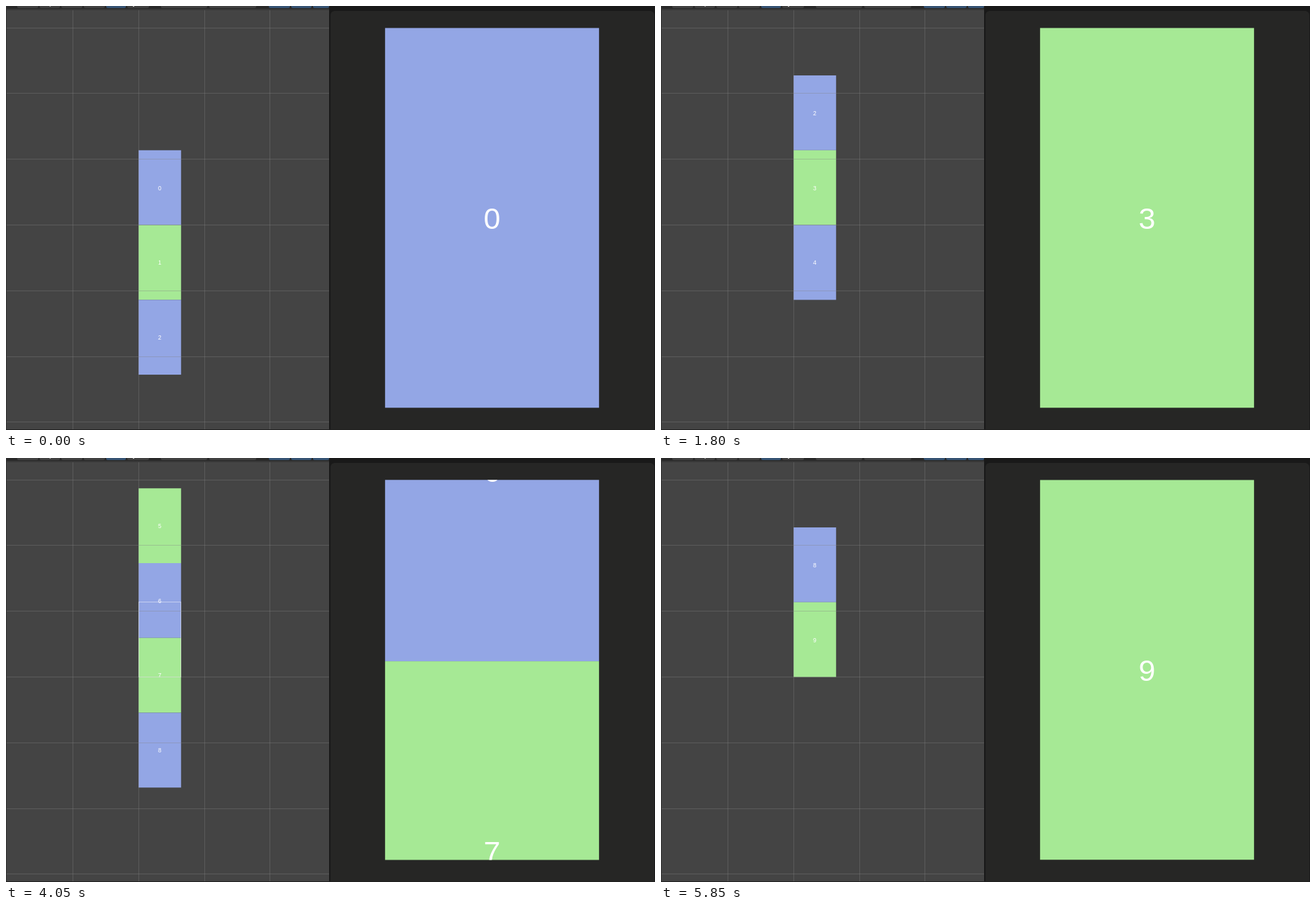
Recreate the animation shown at these times as an HTML page with a canvas. Size 926 px wide and 605 px high, loop 5.88 s.

```html
<!DOCTYPE html>
<html lang="en">
<head>
<meta charset="utf-8">
<title>Paged scroll view</title>
<style>
html, body { margin: 0; width: 100%; height: 100%; overflow: hidden; background: #262625; }
canvas { display: block; width: 926px; height: 605px; }
</style>
</head>
<body>
<canvas id="stage" width="926" height="605"></canvas>
<script>
const ctx = document.getElementById('stage').getContext('2d');
const LOOP = 5880, STEP = 30, MOVE = 110, LEAD = 4, LAST_PAGE = 9;
const BLUE = '#93a6e5', GREEN = '#a6e995';

// Start time of every page turn; the game view picks up the last one late.
const sceneTurns = [480, 1140, 1680, 2190, 2730, 3270, 4020, 4650, 5340];
const gameTurns = [...sceneTurns.slice(0, -1), 5355];

const sceneView = { x: 189, y: 205.8, width: 60.8, height: 106.75, font: 8.5, baseline: 56.7 };
const gameView = { x: 540.6, y: 31.2, width: 305.8, height: 542.3, font: 43, baseline: 286.6 };

function scrollAt(time, turns) {
  return turns.reduce((sum, start) => {
    const x = Math.min(1, Math.max(0, (time - start + LEAD) / MOVE));
    return sum + 1 - (1 - x) ** 2;
  }, 0);
}

function fill(color, x, y, width, height) {
  ctx.fillStyle = color;
  ctx.fillRect(x, y, width, height);
}

function roundFill(color, x, y, width, height, radii) {
  ctx.fillStyle = color;
  ctx.beginPath();
  ctx.roundRect(x, y, width, height, radii);
  ctx.fill();
}

function drawPages(view, scroll, first, last) {
  ctx.font = `${view.font}px "Liberation Sans", Arial, sans-serif`;
  ctx.textAlign = 'center';
  for (let page = first; page <= last; page++) {
    const top = view.y + (page - scroll) * view.height;
    fill(page % 2 ? GREEN : BLUE, view.x, top, view.width, view.height);
    ctx.fillStyle = '#fff';
    ctx.fillText(page, view.x + view.width / 2, top + view.baseline);
  }
}

function drawGrid() {
  const color = 'rgba(132,132,132,.36)';
  for (let x = 95; x < 461; x += 93.8) fill(color, Math.round(x), 5, 1, 599);
  for (let y = 30.6; y < 604; y += 93.8) fill(color, 0, Math.round(y), 461, 1);
}

function drawToolbar() {
  fill('#292929', 0, 0, 461, 4);
  fill('#383838', 0, 4, 461, 2);
  const button = (x, width, color = '#414141') => roundFill(color, x, -4, width, 7, 2);
  [[16, 30], [48, 29], [79, 30], [111, 30], [173, 31], [221, 66], [290, 67]]
    .forEach(([x, width]) => button(x, width));
  [[143, 28], [375, 30], [407, 29], [438, 23]]
    .forEach(([x, width]) => button(x, width, '#365373'));
  fill('#999', 62, 0, 2, 1);
  fill('#ccc', 181, 0, 2, 1);
}

function drawScene(scroll) {
  fill('#444', 0, 0, 461, 605);
  const first = Math.max(0, Math.floor(scroll) - 1);
  const last = Math.min(LAST_PAGE, Math.max(2, Math.ceil(scroll) + 1));
  drawPages(sceneView, scroll, first, last);
  drawGrid();
  if (scroll % 1) {
    ctx.strokeStyle = 'rgba(255,255,255,.45)';
    ctx.lineWidth = 1;
    ctx.strokeRect(189.5, 205.5, 60, 107);
  }
  drawToolbar();
  fill('#303030', 0, 0, 1, 605);
}

function drawGame(scroll) {
  fill('#191919', 461, 0, 465, 605);
  roundFill('#262625', 463, 7, 462, 597, [6, 6, 0, 0]);
  ctx.save();
  ctx.beginPath();
  ctx.rect(gameView.x, gameView.y, gameView.width, gameView.height);
  ctx.clip();
  drawPages(gameView, scroll, Math.floor(scroll), Math.ceil(scroll));
  ctx.restore();
}

function render(now) {
  const time = Math.floor((now % LOOP) / STEP) * STEP;
  drawScene(scrollAt(time, sceneTurns));
  drawGame(scrollAt(time, gameTurns));
  fill('#202020', 0, 604, 926, 1);
  requestAnimationFrame(render);
}
requestAnimationFrame(render);
</script>
</body>
</html>
```
